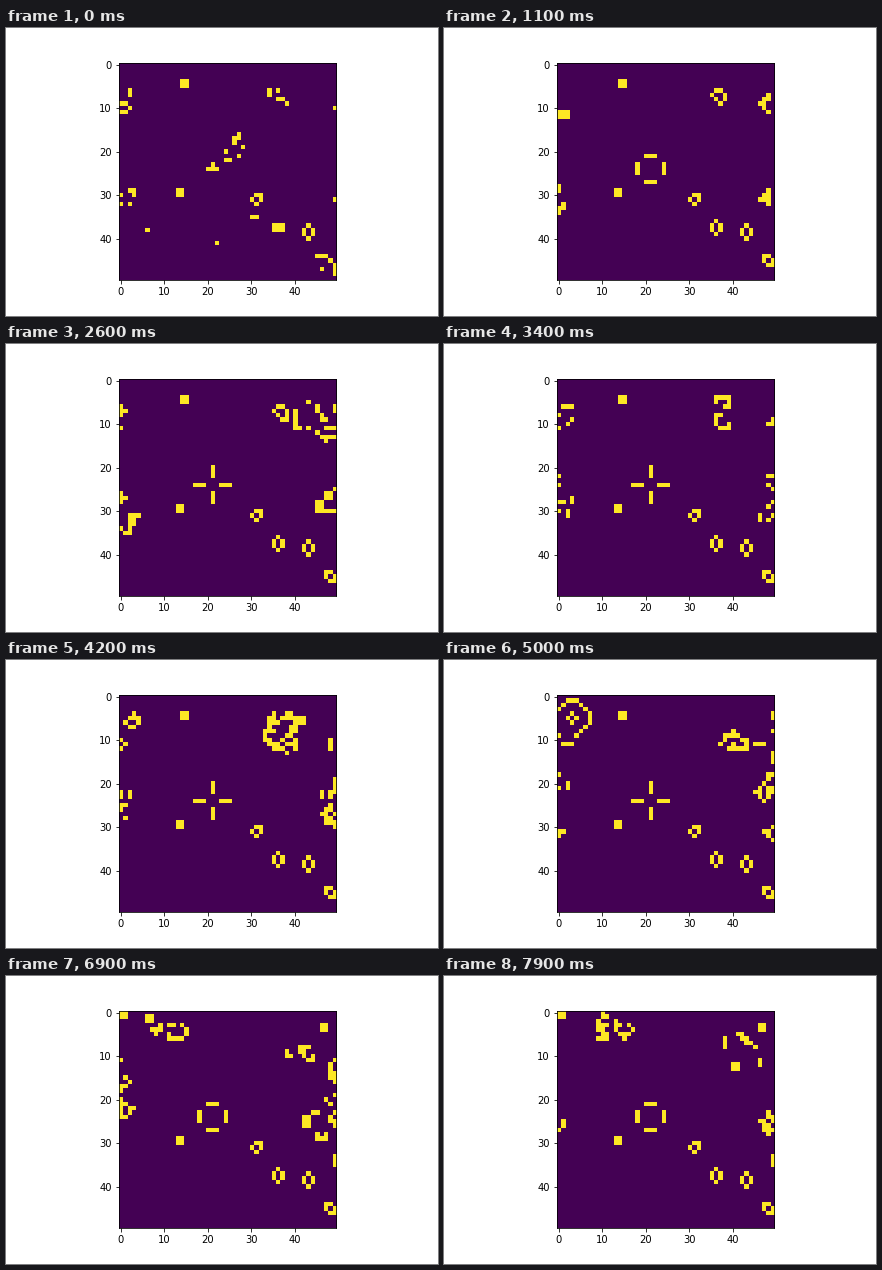
Write a matplotlib script that moves like this. It is 432 by 288 pixels and loops after 8 s.

```python
import matplotlib.pyplot as plt
import numpy as np
from matplotlib.animation import FuncAnimation

SIZE = 50
FRAMES = 80
INTERVAL = 100

# (top row, left column, shape); shapes wrap around the edges
COLONIES = [
    (4, 14, "OO/OO"),
    (6, 2, "O/O"),
    (6, 34, "O.O../O..../..OO./....O"),
    (9, 49, ".OO./O..O/.OO."),
    (16, 26, ".O./OO./O../..O/.../.O."),
    (20, 24, "O./../OO"),
    (23, 20, ".O./OOO"),
    (29, 13, "OO/OO"),
    (29, 49, "...OO/.O..O/O..../.O.O."),
    (30, 30, ".OO/O.O/.O."),
    (35, 30, "OO"),
    (37, 35, "OOO/OOO"),
    (37, 42, ".O./O.O/O.O/.O."),
    (38, 6, "O"),
    (41, 22, "O"),
    (44, 45, "OOO../...O./....O/.O..O/....O"),
]


def first_generation():
    grid = np.zeros((SIZE, SIZE), dtype=int)
    for top, left, shape in COLONIES:
        for dy, line in enumerate(shape.split("/")):
            for dx, cell in enumerate(line):
                if cell == "O":
                    grid[(top + dy) % SIZE, (left + dx) % SIZE] = 1
    return grid


def next_generation(grid):
    """One step of Conway's rules on a torus."""
    neighbours = sum(
        np.roll(grid, (dy, dx), axis=(0, 1))
        for dy in (-1, 0, 1)
        for dx in (-1, 0, 1)
        if (dy, dx) != (0, 0)
    )
    return ((neighbours == 3) | ((grid == 1) & (neighbours == 2))).astype(int)


generations = [first_generation()]
while len(generations) < FRAMES:
    generations.append(next_generation(generations[-1]))

fig, ax = plt.subplots(figsize=(6, 4), dpi=72)
fig.subplots_adjust(left=0.125, right=0.9, bottom=0.125, top=0.88)
image = ax.imshow(generations[0], cmap="viridis", vmin=0, vmax=1,
                  interpolation="nearest")
ax.set_xticks(range(0, SIZE, 10))
ax.set_yticks(range(0, SIZE, 10))


def update(frame):
    image.set_data(generations[frame])
    return (image,)


animation = FuncAnimation(fig, update, frames=FRAMES, interval=INTERVAL,
                          repeat=True, repeat_delay=0)
plt.show()
```
